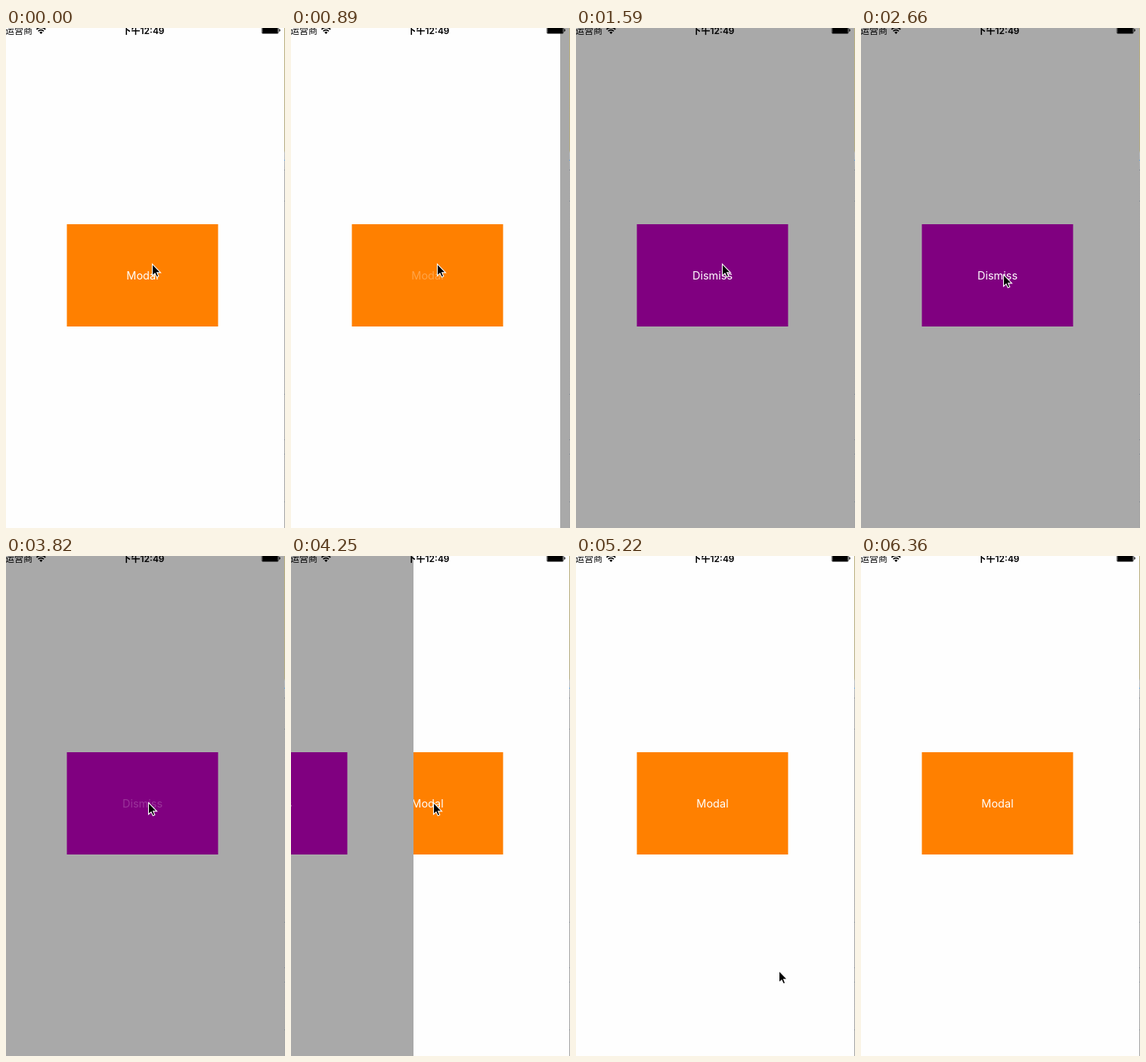
Animation of 369x660 px, one loop 6430 ms. Source, as an HTML page:

```html
<!DOCTYPE html>
<html lang="zh">
<head>
<meta charset="utf-8">
<title>Modal transition</title>
<style>
  html, body { margin: 0; width: 100%; height: 100%; overflow: hidden; background: #fefefe; }
  svg { display: block; width: 369px; height: 660px; }
  .label { font: 400 14.5px Inter, sans-serif; fill: #fff; text-anchor: middle; }
  .status { font: 12px Inter, "Noto Sans CJK SC", "Noto Sans CJK", sans-serif; }
</style>
</head>
<body>
<svg viewBox="0 0 369 660" xmlns="http://www.w3.org/2000/svg">
  <defs>
    <linearGradient id="edge" x1="0" y1="0" x2="0" y2="660" gradientUnits="userSpaceOnUse">
      <stop offset="0" stop-color="#b9ae7c"/>
      <stop offset=".245" stop-color="#b4ac82"/>
      <stop offset=".25" stop-color="#b8bcc0"/>
      <stop offset=".29" stop-color="#a8a8a8"/>
      <stop offset="1" stop-color="#a4a4a4"/>
    </linearGradient>
  </defs>

  <rect width="369" height="660" fill="#fefefe"/>
  <rect x="80.5" y="259" width="200" height="135" fill="#ff8000"/>
  <text id="modal" class="label" x="180.5" y="332">Modal</text>

  <g id="sheet">
    <rect x="-7" width="375" height="660" fill="#a9a9a9"/>
    <rect x="80.5" y="259" width="200" height="135" fill="#800080"/>
    <text id="dismiss" class="label" x="180.5" y="332">Dismiss</text>
  </g>

  <g class="status">
    <text x="-1" y="8.4">运营商</text>
    <text x="153.5" y="8.2" font-weight="600">下午12:49</text>
    <path d="M46.3 8 l-2.1 -2.2 a3 3 0 0 1 4.2 0 z"/>
    <path d="M42.6 4.2 a5.2 5.2 0 0 1 7.4 0 M40.4 1.9 a8.4 8.4 0 0 1 11.8 0" fill="none" stroke="#000" stroke-width="1.6"/>
    <rect x="338.3" y="-3" width="22" height="10.3" rx="1.5" fill="none" stroke="#000" stroke-width=".6"/>
    <rect x="339.2" y="-2" width="20.4" height="9"/>
    <path d="M361.3 1 q1.5 .3 1.5 2 t-1.5 2 z"/>
  </g>

  <rect x="368" width="1" height="660" fill="url(#edge)"/>
  <path d="M368 174.5 h1" stroke="#4aa0e8"/>
  <path d="M368 187.5 h1 M368 228.5 h1 M368 483.5 h1 M368 543.5 h1 M368 562.5 h1 M368 625.5 h1" stroke="#7d8790"/>

  <path id="cursor" d="M.5 .7 V16 L4 12.8 L6.3 17.8 L8.8 16.7 L6.7 11.9 H11.5 Z" fill="#000" stroke="#fff" stroke-width="1.1"/>
</svg>
<script>
  const LOOP = 6430, FRAME = 86, WIDTH = 375, SLIDE = 711;
  const show = { press: 710, start: 890, lead: 89 };
  const hide = { press: 3820, start: 3990, lead: 118 };
  const drift = { start: 2400, frames: 4 };
  const exit = { start: 4960, frames: 5 };

  const [modal, dismiss, sheet, cursor] =
    ["modal", "dismiss", "sheet", "cursor"].map(id => document.getElementById(id));
  const clamp = v => Math.min(1, Math.max(0, v));
  const move = (el, x, y) =>
    el.setAttribute("transform", `translate(${Math.round(x)} ${Math.round(y)})`);

  // pictures shown since a motion began; 0 before it
  const count = (t, start) => Math.max(0, Math.floor((t - start) / FRAME) + 1);

  // cubic-bezier(.42, 0, .58, 1), solved by bisection
  function ease(t) {
    if (t <= 0 || t >= 1) return clamp(t);
    let u = .5;
    for (let half = .25; half > 1e-6; half /= 2) {
      const v = 1 - u;
      const x = 1.26 * v * v * u + 1.74 * v * u * u + u * u * u;
      u += x < t ? half : -half;
    }
    return u * u * (3 - 2 * u);
  }

  // lead is how far the slide has run at its first picture
  function progress(t, { start, lead }) {
    const n = count(t, start);
    return n ? ease((lead + (n - 1) * FRAME) / SLIDE) : 0;
  }

  // a pressed label drops to 20% and fades back as the slide begins
  const labelOpacity = (t, { press }, p) => t < press ? 1 : .2 + .8 * clamp(3 * p);

  function drawPointer(t) {
    const d = clamp(count(t, drift.start) / drift.frames);
    const e = count(t, exit.start) / exit.frames;
    move(cursor, 193 - 5 * d + 100 * e, 311 + 14 * ease(d) + 310 * e ** 1.5);
    cursor.setAttribute("visibility", e > 1 ? "hidden" : "visible");
  }

  function draw(t) {
    const shown = progress(t, show), hidden = progress(t, hide);
    move(sheet, WIDTH * (1 - shown - hidden), 0);
    modal.setAttribute("opacity", labelOpacity(t, show, shown));
    dismiss.setAttribute("opacity", labelOpacity(t, hide, hidden));
    drawPointer(t);
  }

  const start = performance.now();
  function tick() {
    draw((performance.now() - start) % LOOP);
    requestAnimationFrame(tick);
  }
  tick();
</script>
</body>
</html>
```
